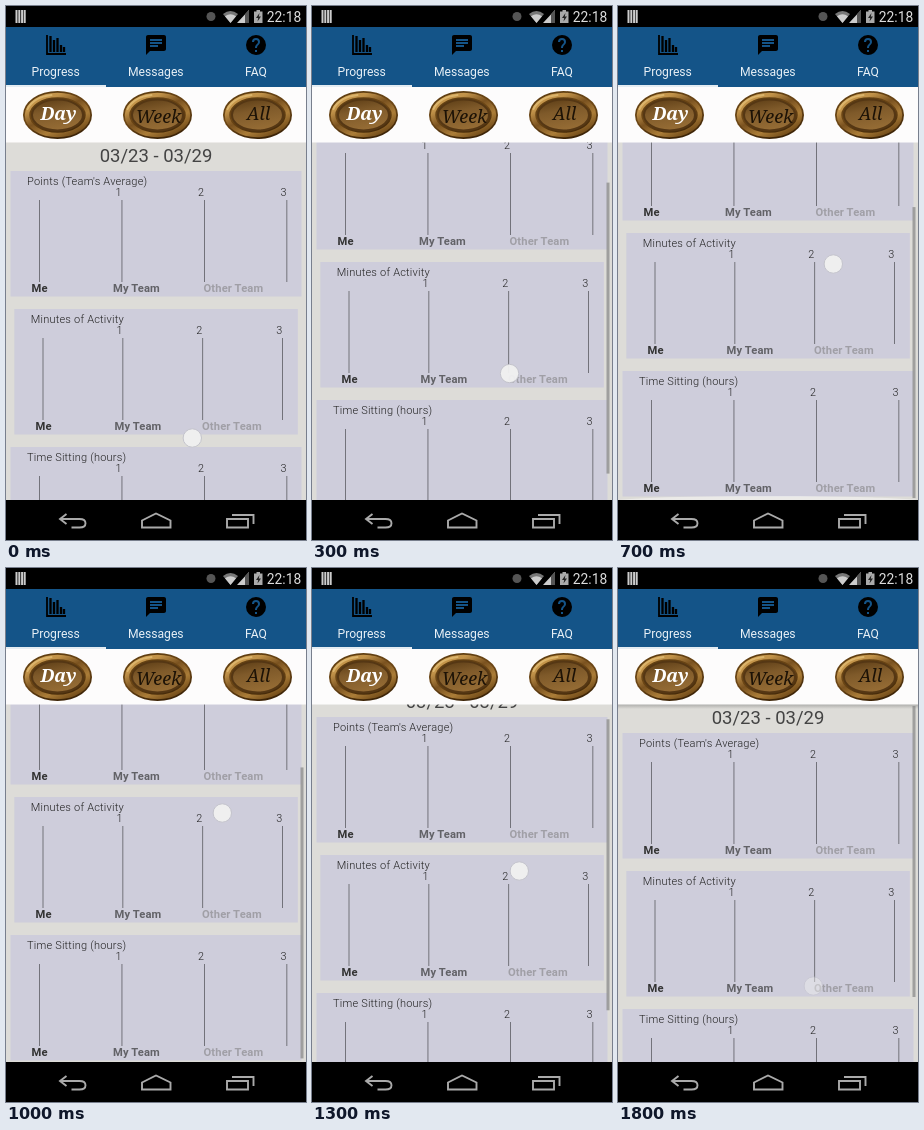
An HTML page for the animation above (1.9 s loop, 300 px wide and 534 px high).

```html
<!DOCTYPE html>
<html lang="en">
<head>
<meta charset="utf-8">
<style>
html, body { margin: 0; width: 100%; height: 100%; overflow: hidden; background: #000; }
svg { display: block; width: 300px; height: 534px; font-family: Roboto, sans-serif; }
.mid { text-anchor: middle; }
.tab { font-size: 12.15px; fill: #e8f0f6; }
.title { font-size: 11px; font-weight: 300; letter-spacing: .21px; fill: #222; }
.num { font-size: 10.8px; font-weight: 300; fill: #222; }
.team { font-size: 11.2px; font-weight: 700; letter-spacing: .12px; }
.gold { font: italic 18px "Noto Serif", serif; }
.nav { fill: none; stroke: #aaa; stroke-width: 1.9; }
</style>
</head>
<body>
<svg viewBox="0 0 300 534">
  <defs>
    <clipPath id="view"><rect y="136" width="300" height="358"/></clipPath>
    <linearGradient id="rim" x1=".2" y1="0" x2=".6" y2="1">
      <stop stop-color="#5c3c10"/><stop offset=".5" stop-color="#6d4716"/>
      <stop offset="1" stop-color="#3a2206"/>
    </linearGradient>
    <linearGradient id="ring" x1="0" y1="0" x2=".8" y2="1">
      <stop stop-color="#c9994a"/><stop offset=".25" stop-color="#c2934a"/>
      <stop offset=".5" stop-color="#7a5220"/><stop offset=".75" stop-color="#ab7d38"/>
      <stop offset="1" stop-color="#6e4817"/>
    </linearGradient>
    <linearGradient id="face" x1="0" y1="0" x2=".3" y2="1">
      <stop stop-color="#5a3b14"/><stop offset=".45" stop-color="#7f5a2a"/>
      <stop offset="1" stop-color="#946b34"/>
    </linearGradient>
    <linearGradient id="edge" x2="0" y2="1">
      <stop stop-color="#777" stop-opacity=".5"/><stop offset="1" stop-color="#777" stop-opacity="0"/>
    </linearGradient>
  </defs>

  <g clip-path="url(#view)">
    <rect y="136" width="300" height="358" fill="#dddcd8"/>
    <g id="page">
      <text class="mid" x="150" y="156" font-size="18.5" fill="#444">03/23 - 03/29</text>
    </g>
    <rect id="bar" x="294.5" width="3" height="291" fill="#909090" opacity=".8"/>
    <rect id="topGlow" y="136" width="300" height="5" fill="url(#edge)"/>
    <ellipse id="endGlow" cx="150" cy="496" rx="160" ry="6" fill="#fff" opacity=".4"/>
  </g>

  <rect width="300" height="21"/>
  <path d="M10.500 4v13M13.300 4v13M16.100 4v13M18.700 4v13" stroke="#ccc" stroke-width="2"/>
  <circle cx="205" cy="10.500" r="4.500" fill="#555"/>
  <path d="M217 8q7.500-6 15 0l-7.500 9z" fill="#777"/>
  <path d="M219 10.200q5.500-4 11 0l-5.500 6.800zM231 17L243 4V17z" fill="#ccc"/>
  <path d="M239 8.300L243 4V17H239z" fill="#555"/>
  <path d="M248 5.500h2.500V4h3.500v1.500h2.500V17H248z" fill="#aaa"/>
  <path d="M253.500 7l-3.500 5h2.200l-.700 3.500 3.500-5h-2.200z" fill="#222"/>
  <text class="mid" x="278" y="16" font-size="13.8" fill="#ddd">22:18</text>

  <rect y="21" width="300" height="60" fill="#145488"/>
  <rect y="79" width="100" height="2" fill="#e4ecf2"/>
  <path d="M41 29v19H60" fill="none" stroke="#000" stroke-width="1.8"/>
  <path d="M44.500 30v16M48 34v12M51.500 32v14M55 39v7M58 41v5" stroke="#000" stroke-width="2.300"/>
  <path transform="translate(138 27)" d="M20 2H4c-1.100 0-2 .9-2 2v18l4-4h14c1.100 0 2-.9 2-2V4c0-1.100-.9-2-2-2zM6 9h12v2H6zm8 5H6v-2h8zm4-6H6V6h12z"/>
  <path transform="translate(238 27)" d="M12 2a10 10 0 1 0 0 20a10 10 0 1 0 0-20zm1 17h-2v-2h2zm2.070-7.750l-.9.920C13.450 12.900 13 13.500 13 15h-2v-.5c0-1.100.450-2.100 1.170-2.830l1.240-1.260c.370-.360.590-.860.590-1.410a2 2 0 0 0-4 0H8a4 4 0 0 1 8 0c0 .880-.360 1.680-.930 2.250z"/>
  <g class="mid tab">
    <text x="49.700" y="70">Progress</text><text x="149.800" y="70">Messages</text><text x="250" y="70">FAQ</text>
  </g>

  <rect y="81" width="300" height="55.500" fill="#fdfcfc"/>
  <g id="buttons"></g>

  <rect y="494" width="300" height="40"/>
  <path class="nav" d="M60.500 508l-6.500 5 6.500 5M54 513h19.500q6 0 6 4.200t-6 4.300h-8"/>
  <path class="nav" d="M136 514.500l14-7 14.500 7v7H136z"/>
  <path class="nav" d="M221 513h21v8.500h-21zM226 509h21.500v9"/>

  <circle id="touch" r="9.200" fill="#f1f1f1" stroke="#c2c2ca"/>
</svg>
<script>
const LOOP = 1900, STEP = 100, END = 76;
const $ = id => document.getElementById(id);

function card(title, y, left, width, firstLine, gap, labelXs) {
  const text = (cls, x, dy, s, fill = '') =>
    `<text class="${cls}" x="${x}" y="${y + dy}" ${fill && `fill="${fill}"`}>${s}</text>`;
  let out = `<rect x="${left}" y="${y}" width="${width}" height="125.5" fill="#cecddb"/>`;
  for (let i = 0; i < 4; i++) {
    const x = firstLine + i * gap;
    out += `<rect x="${x}" y="${y + 29}" width=".8" height="82" fill="#5c5c62"/>`;
    if (i) out += text('num mid', x - 3, 25, i);
  }
  out += text('title', left + 16.5, 14.3, title);
  ['Me', 'My Team', 'Other Team'].forEach((s, i) =>
    out += text('team', labelXs[i], 121, s, ['#333', '#626267', '#a09fa6'][i]));
  return out;
}

const wide = [4.5, 291, 33.1, 82.45, [25.5, 107, 197.5]];
const narrow = [8.3, 283.5, 36.6, 79.85, [29.5, 108.5, 196]];
$('page').innerHTML += card("Points (Team's Average)", 165, ...wide) +
  card('Minutes of Activity', 303, ...narrow) +
  card('Time Sitting (hours)', 441, ...wide);

$('buttons').innerHTML = ['Day', 'Week', 'All'].map((name, i) => {
  const x = 51.5 + i * 100;
  const oval = (rx, ry, paint) => `<ellipse cx="${x}" cy="109" rx="${rx}" ry="${ry}" ${paint}/>`;
  return oval(34.5, 24, 'fill="url(#rim)"') +
    oval(30.5, 20, 'fill="none" stroke="url(#ring)" stroke-width="4.5"') +
    oval(25.5, 15.5, 'fill="url(#face)" stroke="#553714" stroke-width="2"') +
    `<path d="M${x - 30} 103q6-12 24-14" fill="none" stroke="#e6c27a" stroke-width="2" stroke-linecap="round" opacity=".7"/>
    <text class="gold mid" x="${x + 1}" y="${i == 1 ? 117 : 114}" fill="${i ? '#1c1206' : '#fff'}"
      style="font-weight:${i ? 400 : 700}">${name}</text>`;
}).join('');

// time, finger x, finger y, scroll offset
const keys = [
  [0, 186, 432, 0], [100, 190, 414, 2], [200, 194, 394, 21], [400, 200.5, 341, 72],
  [500, 204, 313, END], [700, 215, 258, END], [800, 217, 246, END], [900, 217, 243, END],
  [1000, 216, 245, 74], [1100, 215, 254, 65], [1200, 213, 271, 48], [1300, 207, 303, 16],
  [1400, 201, 335, 0], [1600, 196, 387, 0], [1800, 195, 418, 0]
];

function pose(t) {
  const i = Math.max(1, keys.findIndex(k => k[0] >= t));
  const a = keys[i - 1], b = keys[i], f = (t - a[0]) / (b[0] - a[0]);
  return a.map((v, n) => v + (b[n] - v) * f);
}

const show = (id, on) => $(id).style.display = on ? '' : 'none';

function draw(now) {
  const t = Math.floor(now % LOOP / STEP) * STEP;
  const [, x, y, scroll] = pose(t);
  $('page').setAttribute('transform', `translate(0 ${-Math.round(scroll)})`);
  $('bar').setAttribute('y', 138 + scroll * 0.83);
  show('bar', t >= 100);
  show('topGlow', t >= 1400);
  show('endGlow', scroll === END);
  $('touch').setAttribute('transform', `translate(${x + 0.3} ${y})`);
  $('touch').setAttribute('opacity', t < 1800 ? 0.95 : 0.45);
  requestAnimationFrame(() => draw(performance.now()));
}
draw(performance.now());
</script>
</body>
</html>
```
